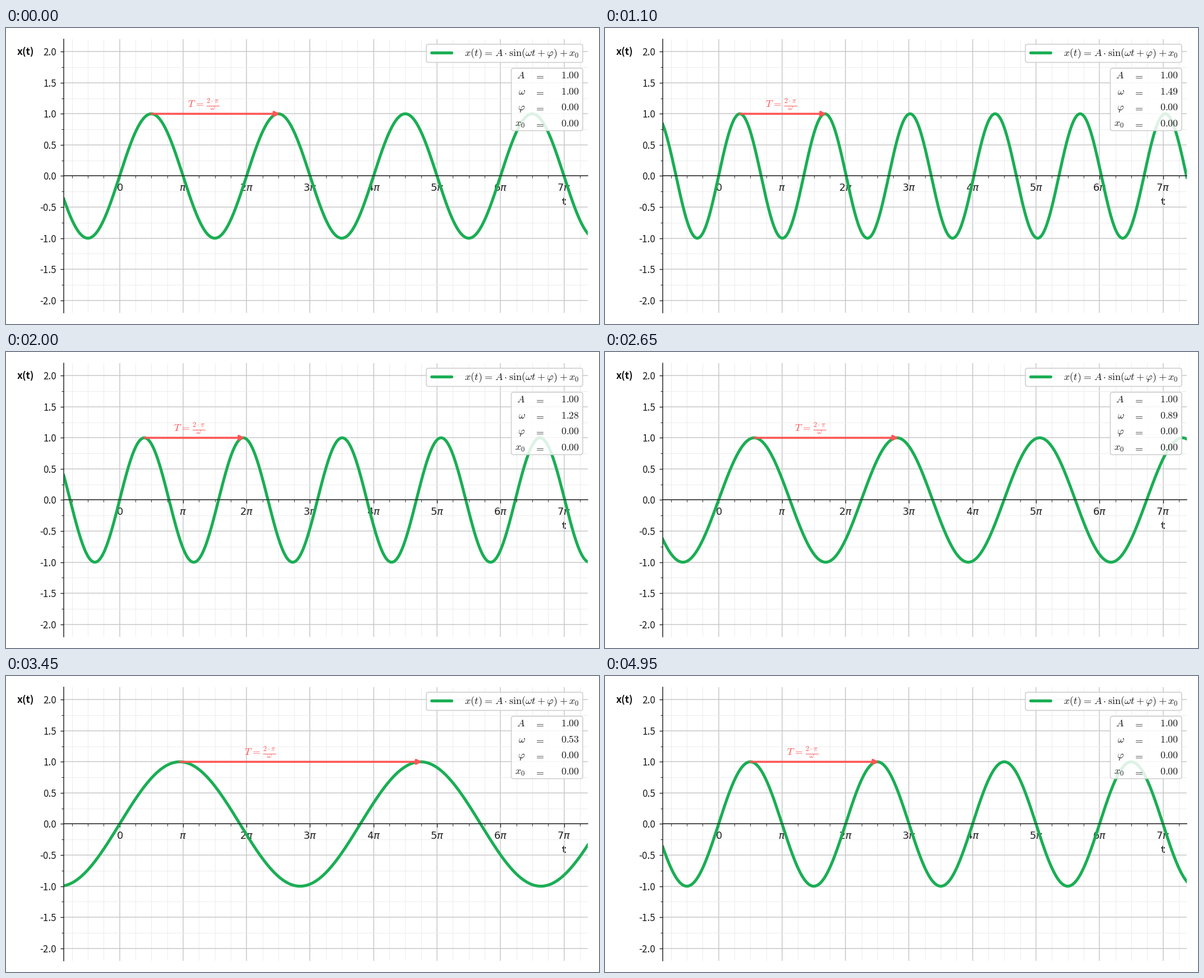
Write a matplotlib script that moves like this. It is 1058x529 px and loops after 5000 ms.

```python
import numpy as np
import matplotlib.pyplot as plt
from matplotlib.animation import FuncAnimation
from matplotlib.patches import FancyArrowPatch, FancyBboxPatch
from matplotlib.ticker import FuncFormatter, MultipleLocator
from matplotlib.transforms import Affine2D

W, H, DPI = 1058, 529, 72  # at 72 dpi one point is one pixel
FRAMES, INTERVAL = 100, 50
GREEN, RED, INK = "#1aae54", "#ff5555", "#1c1c1c"
SANS = "Noto Sans CJK JP"
PI = np.pi

plt.rcParams["font.family"] = SANS
plt.rcParams["axes.unicode_minus"] = False

fig = plt.figure(figsize=(W / DPI, H / DPI), dpi=DPI, facecolor="white")
left, right, top, bottom = 103, 1038, 20, 509
ax = fig.add_axes([left / W, 1 - bottom / H, (right - left) / W, (bottom - top) / H])
ax.set_xlim(-0.88 * PI, 7.375 * PI)
ax.set_ylim(-2.2, 2.2)

# Pixel coordinates with the origin at the top left
px = Affine2D().scale(1 / DPI, -1 / DPI).translate(0, H / DPI) + fig.dpi_scale_trans


def pi_label(x, _):
    n = round(x / PI)
    return "$0$" if n == 0 else r"$\pi$" if n == 1 else rf"${n}\pi$"


def math(x, y, s, ha="left", size=18, **kw):
    kw = {"transform": px, "color": INK, "zorder": 6, **kw}
    return ax.text(x, y, s, ha=ha, va="baseline", fontsize=size,
                   math_fontfamily="cm", **kw)


def box(x0, y0, x1, y1):
    r = 4
    ax.add_patch(FancyBboxPatch(
        (x0 + r, y0 + r), x1 - x0 - 2 * r, y1 - y0 - 2 * r,
        boxstyle=f"round,pad={r}", transform=px, clip_on=False, zorder=5,
        fc=(1, 1, 1, 0.85), ec="#cccccc", lw=1.5))


# Axes, ticks and grid
for side in ("top", "right"):
    ax.spines[side].set_visible(False)
ax.spines["bottom"].set_position(("data", 0))
for side in ("left", "bottom"):
    ax.spines[side].set(color="#262626", linewidth=1.5)

ax.xaxis.set_major_locator(MultipleLocator(PI))
ax.xaxis.set_minor_locator(MultipleLocator(PI / 4))
ax.xaxis.set_major_formatter(FuncFormatter(pi_label))
ax.yaxis.set_major_locator(MultipleLocator(0.5))
ax.yaxis.set_minor_locator(MultipleLocator(0.25))
ax.yaxis.set_major_formatter(FuncFormatter(lambda y, _: f"{y:.1f}"))
ax.tick_params(which="major", length=6, width=1.4, color="#262626",
               labelcolor=INK, pad=7)
ax.tick_params(which="minor", length=4, width=1, color="#262626")
ax.tick_params(axis="y", labelsize=17)
ax.tick_params(axis="x", labelsize=17.7)
for label in ax.get_xticklabels():
    label.set_math_fontfamily("dejavusans")
ax.grid(which="major", color="#c8c8c8", lw=1.5)
ax.grid(which="minor", color="#ececec", lw=1)

for x, y, s in ((35, 41, "x(t)"), (995.5, 309, "t")):
    ax.text(x, y, s, transform=px, ha="center", va="center_baseline",
            fontsize=17.5, weight="bold", color="#111111", zorder=1.4)

# Legend and parameter table
box(750, 29, 1029, 61.5)
ax.plot([759, 795], [44, 44], transform=px, color=GREEN, lw=5.2,
        solid_capstyle="round", clip_on=False, zorder=6,
        scalex=False, scaley=False)
math(1023, 50.5, r"$x(t)\hspace{0.08}=\hspace{0.08}A\cdot\sin(\omega t+\varphi)+x_0$",
     ha="right", size=18.2)

box(901.5, 72, 1029, 183.5)
cells = {}
rows = (("A", 1), (r"\omega", 1), (r"\varphi", 0), ("x_0", 0))
for i, (name, value) in enumerate(rows):
    y = 90.3 + 28.5 * i
    math(926.5, y, f"${name}$", ha="right")
    math(951.5, y, "$=$", ha="center")
    cells[name] = math(1023.5, y, f"${value:.2f}$", ha="right")

# Moving parts
t = np.linspace(*ax.get_xlim(), 1200)
curve, = ax.plot(t, np.sin(t), color=GREEN, lw=5.2)
arrow = FancyArrowPatch((0, 1), (1, 1), arrowstyle="-|>", mutation_scale=18,
                        shrinkA=0, shrinkB=0, lw=3.6, color=RED, zorder=4)
ax.add_patch(arrow)
period = math(0, 1.1, r"$T\hspace{0.08}=\hspace{0.08}\frac{2\cdot\pi}{\omega}$",
              ha="center", transform=ax.transData, color=RED, zorder=4)
TIP = 0.08  # compensates for the rounded head


def update(i):
    omega = 1 + 0.5 * np.sin(2 * PI * i / (FRAMES - 1))
    peak = PI / (2 * omega)
    curve.set_ydata(np.sin(omega * t))
    arrow.set_positions((peak, 1), (peak + 2 * PI / omega + TIP, 1))
    period.set_x(PI / omega + 1)
    cells[r"\omega"].set_text(f"${omega:.2f}$")
    return curve, arrow, period, cells[r"\omega"]


anim = FuncAnimation(fig, update, frames=FRAMES, interval=INTERVAL,
                     repeat=True, repeat_delay=0)
plt.show()
```
